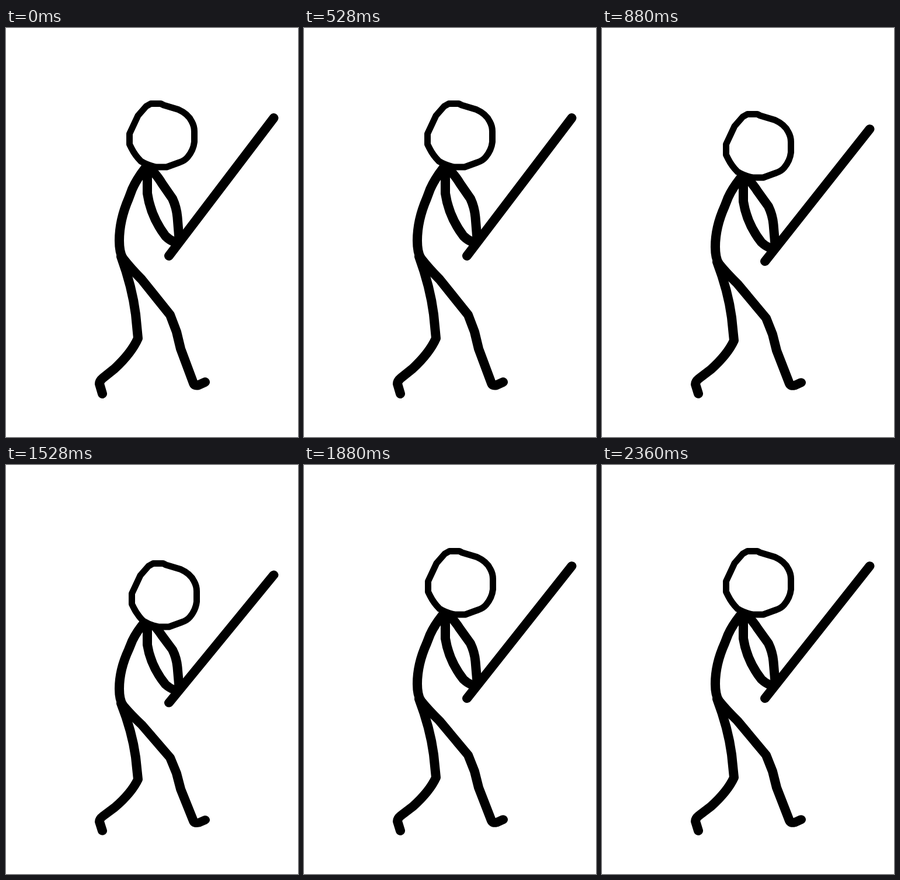
These frames come from a looping animation (500x700 px, 2680 ms). An HTML page:

```html
<!DOCTYPE html>
<html lang="en">
<head>
<meta charset="utf-8">
<title>Stick figure</title>
<style>
  html, body { margin: 0; width: 100%; height: 100%; overflow: hidden; background: #fff; }
  svg { display: block; width: 500px; height: 700px; }
  path { fill: none; stroke: #000; stroke-width: 16; stroke-linecap: round; stroke-linejoin: round; }
  #head path { fill: #fff; stroke-width: 11; }
</style>
</head>
<body>
<svg viewBox="0 0 500 700">
  <g id="body">
    <path d="M239 239Q224 258 216 276L210 292Q194 329 194 364Q194 384 200 394"/>
    <path d="M242 240V283Q248 323 273 356Q280 363 288 366"/>
    <path d="M248 242Q258 251 267 266L285 292Q292 307 293.500 324L296.500 361"/>
    <path d="M279 390L458.500 154"/>
    <path d="M197 391Q216 443 222 490L226 531Q215 556 186 583L166 599Q160 604 160 609L165 626"/>
    <path d="M200 394Q214 412 232 430L281 491L292 520L299 549L321 608Q323 613 330 611L341 606"/>
  </g>
  <g id="head">
    <path d="M248 129.500H265L270 132L295 139.500Q312 147 318 160Q322.500 168 322.500 177V195Q321 209 311 221Q306 227 297 230L275 238H257Q242 235 231 228Q221 218 215 206L211.500 199V181L226 150L240 134Z"/>
  </g>
</svg>
<script>
  const LOOP = 2680, FLOOR = 627;
  const body = document.getElementById('body');
  const head = document.getElementById('head');

  // Each pose: vertical squash above the feet, and head offset.
  const up   = { squash: 1,    x: 0, y: 0 };
  const mid  = { squash: 0.96, x: 1, y: 18 };
  const down = { squash: 0.928, x: 4, y: 39 };
  const steps = [[0, up], [880, mid], [1000, down], [1880, mid]];

  let shown;
  function draw(now) {
    const t = now % LOOP;
    const pose = steps.filter(([start]) => t >= start).pop()[1];
    if (pose !== shown) {
      shown = pose;
      body.setAttribute('transform',
        `translate(0 ${FLOOR * (1 - pose.squash)}) scale(1 ${pose.squash})`);
      head.setAttribute('transform', `translate(${pose.x} ${pose.y})`);
    }
  }

  const begin = performance.now();
  function tick() {
    draw(performance.now() - begin);
    requestAnimationFrame(tick);
  }
  tick();
</script>
</body>
</html>
```
